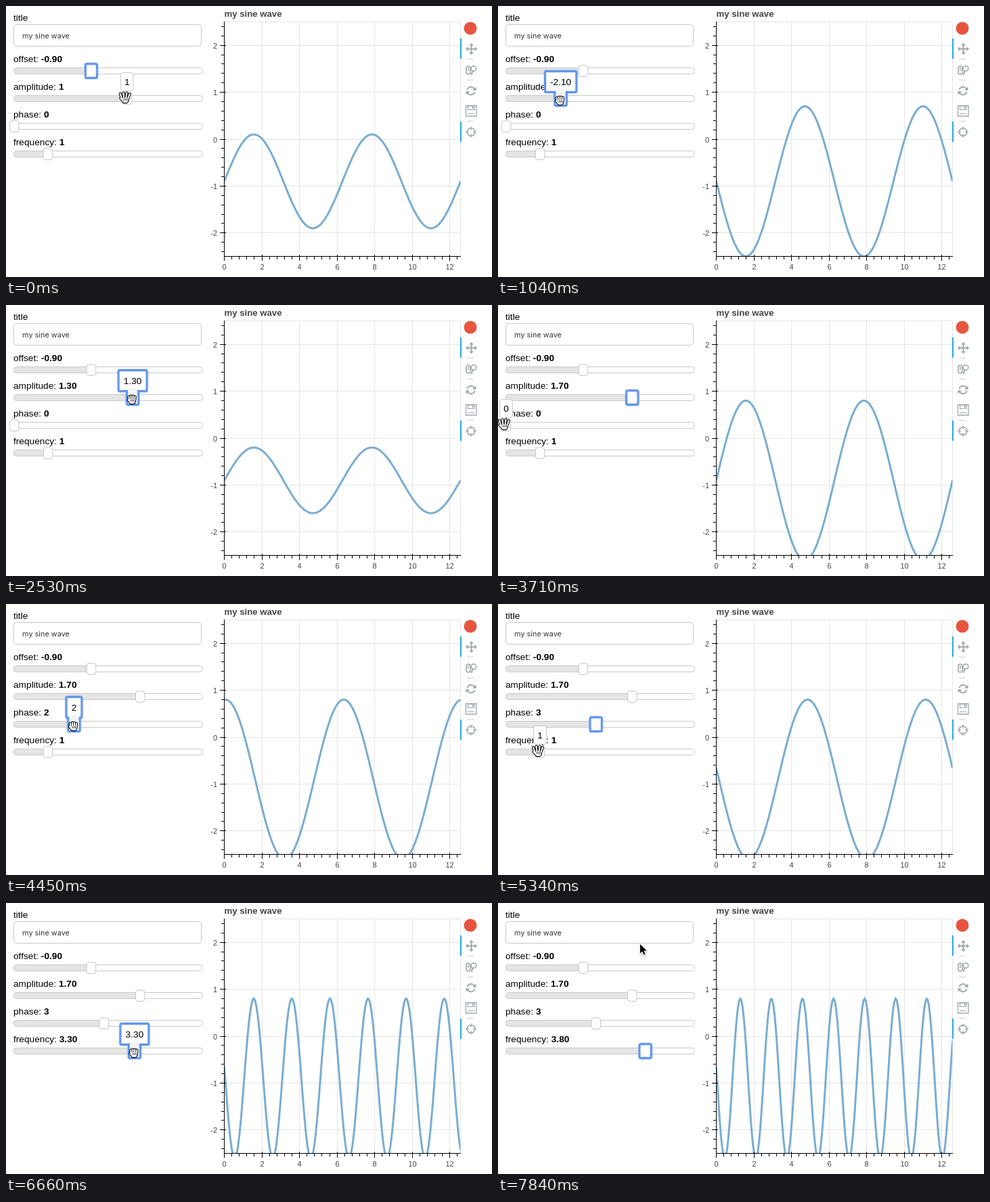
An HTML page with a canvas that plays this animation: 718 px wide and 401 px high, repeating every 7990 ms.

```html
<!DOCTYPE html>
<html lang="en">
<head>
<meta charset="utf-8">
<title>Sine wave sliders</title>
<style>
html, body { margin: 0; width: 100%; height: 100%; overflow: hidden; background: #fff; }
canvas { display: block; }
</style>
</head>
<body>
<canvas id="stage" width="718" height="401"></canvas>
<script>
const ctx = document.getElementById('stage').getContext('2d');
const SANS = '"Liberation Sans", Arial, sans-serif';
const LABEL = '13.7px ' + SANS, TICK = '11px ' + SANS;
const LOOP = 7990, STEP = 148, LAST_STEP = 53;
const GRAY = '#a1a6a9', FOCUS = '#6095ee', BORDER = '#c8c8c8', GRID = '#e5e5e5';
const TURN = 2 * Math.PI;

// The picture advances in even steps; all times below are step numbers.
const sliders = [
  { name: 'offset', min: -5, max: 5, start: -0.9, moves: [] },
  { name: 'amplitude', min: -5, max: 5, start: 1, moves: [
    { from: 0, to: 8, value: -2.5 }, { from: 10.66, to: 17.67, value: 1.7 }] },
  { name: 'phase', min: 0, max: TURN, start: 0, moves: [{ from: 26, to: 32, value: 3 }] },
  { name: 'frequency', min: 0.1, max: 5.1, start: 1, moves: [{ from: 38, to: 48, value: 3.8, ease: 1.5 }] }
];
sliders.forEach((slider, i) => slider.y = 96 + 41 * i);
const [offset, amplitude, phase, frequency] = sliders;

const drags = [
  { slider: amplitude, arrive: 0, grab: 1, release: 20 },
  { slider: phase, arrive: 25, grab: 26, release: 32 },
  { slider: frequency, arrive: 36, grab: 38, release: 48 }
];
const exit = { arrive: LAST_STEP, x: 210, y: 61 };

const clamp01 = v => Math.max(0, Math.min(1, v));
const mix = (a, b, t) => a + (b - a) * t;

function valueAt(slider, s) {
  const value = slider.moves.reduce((v, { from, to, value, ease = 1 }) =>
    mix(v, value, 1 - (1 - clamp01((s - from) / (to - from))) ** ease), slider.start);
  return Math.round(value * 10) / 10;
}
const thumbX = (slider, s) => 12 + 278 * (valueAt(slider, s) - slider.min) / (slider.max - slider.min);
const format = v => Number.isInteger(v) ? String(v) : v.toFixed(2);

function pointerAt(s) {
  const onThumb = ({ slider }, step) => ({ x: thumbX(slider, step) - 1, y: slider.y + 2 });
  const current = drags.find(d => s >= d.arrive && s <= d.release);
  if (current) {
    const mode = s < current.grab ? 'open' : 'closed';
    const { x, y } = onThumb(current, s);
    return mode === 'open' ? { x: x - 2, y: y - 3, mode } : { x, y, mode };
  }
  const left = drags.filter(d => s > d.release).pop();
  const next = drags.find(d => d.arrive > s);
  const a = onThumb(left, left.release);
  const b = next ? onThumb(next, next.arrive) : exit;
  const t = (s - left.release) / ((next || exit).arrive - left.release);
  return { x: mix(a.x, b.x, t), y: mix(a.y, b.y, t), mode: 'arrow' };
}

function text(str, x, y, font, color = '#000', align = 'left') {
  ctx.font = font;
  ctx.fillStyle = color;
  ctx.textAlign = align;
  ctx.fillText(str, x, y);
  return ctx.measureText(str).width;
}
function stroke(color, width) {
  ctx.strokeStyle = color;
  ctx.lineWidth = width;
  ctx.stroke();
}
function trace(points) {
  ctx.beginPath();
  points.forEach(([x, y]) => ctx.lineTo(x, y));
}
function line(points, color, width = 1) {
  trace(points);
  stroke(color, width);
}
function polygon(points, fill) {
  trace(points);
  ctx.closePath();
  ctx.fillStyle = fill;
  ctx.fill();
}
function box(x, y, w, h, r, fill, border, width = 1) {
  ctx.beginPath();
  ctx.roundRect(x, y, w, h, r);
  if (fill) { ctx.fillStyle = fill; ctx.fill(); }
  if (border) stroke(border, width);
}
function arc(x, y, r, from = 0, to = TURN, width = 1.5) {
  ctx.beginPath();
  ctx.arc(x, y, r, from, to);
  stroke(GRAY, width);
}
// Draws the same part four times, a quarter turn apart.
function fourWays(x, y, draw) {
  for (let i = 0; i < 4; i++) {
    ctx.save();
    ctx.translate(x, y);
    ctx.rotate(i * TURN / 4);
    draw();
    ctx.restore();
  }
}

function drawTrack(slider, s) {
  const { y, name } = slider;
  const width = text(name + ': ', 11, y - 13.5, LABEL);
  text(format(valueAt(slider, s)), 11 + width, y - 13.5, 'bold ' + LABEL);
  box(11.5, y - 4.5, 279, 9, 4, '#fff');
  box(11.5, y - 4.5, thumbX(slider, s) - 11, 9, 4, GRID);
  box(11.5, y - 4.5, 279, 9, 4, null, BORDER);
}

function drawHandle(slider, s, focused, hovered) {
  const { y } = slider, x = thumbX(slider, s), label = format(valueAt(slider, s));
  ctx.font = LABEL;
  const half = ctx.measureText(label).width / 2 + 6;
  if (focused) {
    ctx.save();
    ctx.shadowColor = FOCUS;
    ctx.shadowBlur = 2;
    box(x - 8.5, y - 10.2, 17, 20.6, 2, null, FOCUS, 3);
    if (hovered) box(x - half - 1.5, y - 40.5, 2 * half + 3, 31, 2, null, FOCUS, 3);
    ctx.restore();
    const top = hovered ? 12 : 8.7;
    box(x - 7, y - top, 14, top + 8.9, 1, '#fff');
    if (hovered) box(x - half, y - 39, 2 * half, 28, 1, '#fff');
  }
  box(x - 6.8, y - 8.2, 13.6, 16.7, 4, '#fff', focused ? '#d5dcec' : '#c4c4c4');
  if (hovered) {
    box(x - half + 0.5, y - 38.5, 2 * half - 1, 27, 3, '#fff', focused ? '#e4e4e4' : BORDER);
    text(label, x, y - 20.5, LABEL, '#000', 'center');
  }
}

const plotX = v => 322.5 + v * 349 / (2 * TURN);
const plotY = v => 197 - v * 69.4;
const crisp = v => Math.floor(v + 0.01) + 0.5;

function drawPlot(s) {
  for (let v = 0; v <= 12; v += 2) line([[crisp(plotX(v)), 24], [crisp(plotX(v)), 370]], GRID);
  for (let v = -2; v <= 2; v++) line([[322, crisp(plotY(v))], [671, crisp(plotY(v))]], GRID);
  box(322.5, 23.5, 349, 347, 0, null, GRID);

  const [shift, height, lead, rate] = sliders.map(slider => valueAt(slider, s));
  const wave = Array.from({ length: 200 }, (_, i) => {
    const v = 2 * TURN * i / 199;
    return [plotX(v), plotY(shift + height * Math.sin(rate * v + lead))];
  });
  ctx.save();
  ctx.beginPath();
  ctx.rect(322, 23.5, 349.5, 347);
  ctx.clip();
  line(wave, '#79add2', 3);
  ctx.restore();

  line([[322.5, 23], [322.5, 371]], '#000');
  line([[322, 370.5], [672, 370.5]], '#000');
  for (let i = 0; i <= 31; i++) {
    const x = crisp(plotX(i * 0.4)), major = i % 5 === 0;
    line([[x, major ? 368 : 370], [x, major ? 377 : 375]], '#000');
    if (major) text(String(i * 0.4), x, 390, TICK, '#444', 'center');
  }
  for (let i = -12; i <= 12; i++) {
    const y = crisp(plotY(i / 5)), major = i % 5 === 0;
    line([[major ? 316 : 318, y], [major ? 325 : 322, y]], '#000');
    if (major) text(String(i / 5), 312, y + 4, TICK, '#444', 'right');
  }
  text('my sine wave', 322.5, 16, 'bold 13.2px ' + SANS, '#444');
}

function drawToolbar() {
  const x = 687;
  ctx.beginPath();
  ctx.arc(686, 33, 9.5, 0, TURN);
  ctx.fillStyle = '#e8543f';
  ctx.fill();
  ctx.fillStyle = '#26aae1';
  [48, 171].forEach(y => ctx.fillRect(671, y, 2, 30));
  [78.5, 109.5, 170.5].forEach(y => line([[681, y], [691, y]], '#cfcfcf'));

  // pan
  fourWays(x + 0.5, 63.5, () => {
    line([[0, 0], [7, 0]], GRAY, 2);
    polygon([[8.5, 0], [5, -3.5], [5, 3.5]], GRAY);
  });
  // wheel zoom
  box(680, 89, 6, 12, 3, null, GRAY, 1.6);
  line([[683, 91], [683, 96]], GRAY, 1.4);
  arc(691, 92.5, 3.8);
  line([[689.5, 96], [687.5, 102]], GRAY, 2);
  // reset
  for (const side of [1, -1]) {
    ctx.save();
    ctx.translate(x, 125.5);
    ctx.scale(side, side);
    arc(0, 0, 5.8, TURN * 0.54, TURN * 0.92, 1.9);
    polygon([[7.5, -6], [7.5, -0.5], [2, -1]], GRAY);
    ctx.restore();
  }
  // save
  box(679.5, 147.5, 15.5, 15.5, 0, null, GRAY, 1.3);
  box(682.5, 148, 9.5, 5.5, 0, null, GRAY, 1.2);
  line([[689.5, 149], [689.5, 152]], GRAY, 2);
  line([[682, 159.5], [692, 159.5]], GRAY);
  // crosshair
  arc(x, 186.5, 5.8);
  fourWays(x, 186.5, () => line([[3, 0], [8, 0]], GRAY, 1.4));
}

function drawHand(open) {
  const length = open ? 10 : 7, spread = open ? 0.24 : 0.06;
  const fingers = [0, 1, 2, 3].map(i => {
    const angle = (i - 1.5) * spread, root = (i - 1.5) * 2.7;
    const reach = length - Math.abs(i - 1.5);
    return [[root, 2], [root + reach * Math.sin(angle), 2 - reach * Math.cos(angle)]];
  });
  const thumb = [[-3, 4], open ? [-6.5, 0.5] : [-5.6, 1.5]];
  const parts = [...fingers, thumb];
  box(-4, 0, 8.5, 7, 3, null, '#000', 2.4);
  parts.forEach(part => line(part, '#000', 4.2));
  box(-4, 0, 8.5, 7, 3, '#fff');
  parts.forEach(part => line(part, '#fff', 2.1));
  [-1.4, 0.8, 3].forEach(x => line([[x, 1], [x, 3.5]], '#000', 0.8));
}

function drawArrow() {
  const shape = [[0, 0], [0, 13.5], [3.1, 10.6], [5.4, 15.6], [7.6, 14.6], [5.4, 9.8], [9.6, 9.6]];
  ctx.shadowColor = 'rgba(0,0,0,.35)';
  ctx.shadowBlur = 2;
  ctx.shadowOffsetY = 1;
  line([...shape, shape[0]], '#fff', 2);
  ctx.shadowColor = 'transparent';
  polygon(shape, '#000');
}

function drawPointer({ x, y, mode }) {
  ctx.save();
  ctx.translate(x, y);
  ctx.lineCap = ctx.lineJoin = 'round';
  if (mode === 'arrow') drawArrow();
  else drawHand(mode === 'open');
  ctx.restore();
}

function render(now) {
  const s = Math.min(LAST_STEP, Math.floor((now % LOOP + 10) / STEP));
  const hover = drags.find(d => s >= d.arrive && s <= d.release);
  const pressed = drags.filter(d => s >= d.grab).pop();
  const focus = pressed ? pressed.slider : offset;

  ctx.fillStyle = '#fff';
  ctx.fillRect(0, 0, 718, 401);
  text('title', 11, 22, LABEL);
  box(11.5, 27.5, 277, 32, 4, '#fff', BORDER);
  text('my sine wave', 24, 48, '10.9px Inter, sans-serif', '#333');

  drawPlot(s - 1); // the chart answers one step after the slider
  drawToolbar();
  sliders.forEach(slider => drawTrack(slider, s));
  sliders.forEach(slider => drawHandle(slider, s, slider === focus, !!hover && hover.slider === slider));
  drawPointer(pointerAt(s));
}

const start = performance.now();
function tick() {
  render(performance.now() - start);
  requestAnimationFrame(tick);
}
tick();
</script>
</body>
</html>
```
